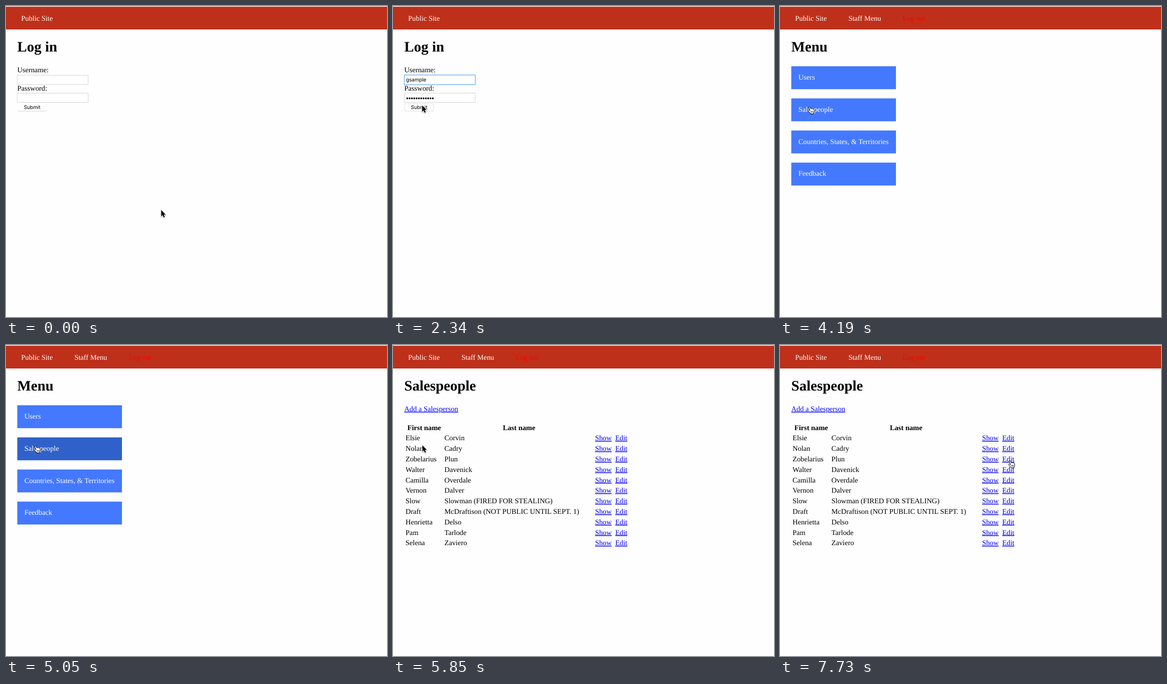
An HTML page that plays this animation: 828 px wide and 676 px high, repeating every 8000 ms.

```html
<!DOCTYPE html>
<html lang="en">
<head>
<meta charset="utf-8">
<title>Staff login</title>
<style>
  html, body { margin: 0; width: 100%; height: 100%; overflow: hidden; background: #fefefe; }
  svg { display: block; width: 828px; height: 676px; }
  text { font: 15.75px "Liberation Serif", serif; text-rendering: geometricPrecision; }
  .title { font-size: 31.5px; font-weight: bold; }
  .head { font-weight: bold; }
  .nav { fill: #fff; }
  .logout { fill: #f00; }
  .link { fill: #00e; text-decoration: underline; }
  .ui { font: 11px Inter, sans-serif; }
  .option { font: 11.7px Inter, sans-serif; }
  .field { fill: #fff; stroke: #d0d0d0; }
  .dropdown { filter: drop-shadow(0 6px 4px rgba(0, 0, 0, .5)); }
</style>
</head>
<body>
<svg viewBox="0 0 828 676" xmlns="http://www.w3.org/2000/svg">
  <defs>
    <linearGradient id="pressedFill" x2="0" y2="1">
      <stop stop-color="#69b1fa"/><stop offset="1" stop-color="#1573f5"/>
    </linearGradient>
    <g id="key">
      <path d="M9 6L1.5 13.5" stroke="#858585" stroke-width="2.8" stroke-linecap="round"/>
      <circle cx="9.5" cy="5" r="4.2" fill="#858585"/>
      <circle cx="11" cy="3.6" r="1.1" fill="#eee"/>
    </g>
  </defs>
  <rect y="1.5" width="828" height="49.5" fill="#be301a"/>
  <text class="nav" x="33" y="32">Public Site</text>
  <g id="staffNav">
    <text class="nav" x="148.7" y="32">Staff Menu</text>
    <text class="logout" x="266.5" y="32">Log out</text>
  </g>

  <g id="login">
    <text class="title" x="24.5" y="99">Log in</text>
    <text x="24.5" y="144">Username:</text>
    <rect class="field" x="24.5" y="150.5" width="154" height="20"/>
    <text x="24.5" y="184">Password:</text>
    <rect class="field" x="24.5" y="189.5" width="154" height="20"/>
    <path d="M25.5 226q1 2.5 3 2.5H85q2 0 3-2.5" fill="none" stroke="#cfcfcf"/>
    <rect id="buttonEdge" x="25.5" y="212.5" width="62.5" height="16" rx="3" fill="none" stroke="#dedede"/>
    <text class="ui" x="38.7" y="224">Submit</text>
    <g id="pressed">
      <rect x="25" y="212" width="63.5" height="17" rx="3" fill="url(#pressedFill)"/>
      <text class="ui" x="38.7" y="224" fill="#fff">Submit</text>
    </g>
    <rect id="focusRing" x="24.5" y="150" width="154.5" height="21" rx="1" fill="none" stroke="#92c1f7" stroke-width="2"/>
    <path id="caret" d="M28.5 153.5V166.5" stroke="#000"/>
    <g id="filled">
      <text class="ui" x="28.3" y="164">gsample</text>
      <path d="M31 200.7H86.7" stroke="#000" stroke-width="3.9" stroke-linecap="round" stroke-dasharray="0 5.05"/>
    </g>
    <g id="dropdown" class="dropdown">
      <rect x="24.5" y="169" width="154.5" height="40.3" fill="#fff"/>
      <rect id="optionHover" x="24.5" y="169" width="154.5" height="20" fill="#ebebeb"/>
      <use href="#key" x="30" y="172"/>
      <text class="option" x="48.7" y="184">jmarlow62</text>
      <use href="#key" x="30" y="192"/>
      <text class="option" x="48.7" y="203.6">gsample</text>
    </g>
  </g>

  <g id="menu"><text class="title" x="24.5" y="99">Menu</text></g>

  <g id="people">
    <text class="title" x="24.5" y="99">Salespeople</text>
    <text class="link" x="24.5" y="144">Add a Salesperson</text>
    <text class="head" x="31.3" y="185">First name</text>
    <text class="head" x="238.7" y="185">Last name</text>
  </g>

  <g id="arrow" style="filter: drop-shadow(0 1px 1px rgba(0,0,0,.4))">
    <path d="M.3 .5V14.3L3.4 11.4L5.8 16.6L8.1 15.6L5.8 10.5H10Z" stroke="#fff" stroke-width="1.6"/>
    <path d="M.3 .5V14.3L3.4 11.4L5.8 16.6L8.1 15.6L5.8 10.5H10Z"/>
  </g>
  <g id="hand" stroke="#000" stroke-linecap="round" stroke-linejoin="round" style="filter: drop-shadow(0 1px .7px rgba(0,0,0,.3))">
    <path fill="#fff" d="M4.8 9L3 3.5C2.5 1.4 4.8 .7 5.4 2.6L6.9 6.2C7.4 5 9.2 5.1 9.5 6.4C10 5.4 11.6 5.6 11.9 7C12.6 6.2 14 6.7 14.1 8L14.3 11C14.3 13 13.1 14 12.9 16.8H6.6C6 14.6 3 12.6 1.2 10.2C.4 8.8 2.2 7.9 3.4 9L4.9 10.4Z"/>
    <path d="M7.5 11V14M9.6 11V14M11.7 11V14" stroke-width=".8"/>
  </g>
  <g id="ibeam">
    <path d="M-2.5 -7.5Q0 -7.5 0 -5.5Q0 -7.5 2.5 -7.5M0 -5.5V5.5M-2.5 7.5Q0 7.5 0 5.5Q0 7.5 2.5 7.5M-1.5 2.5H1.5" fill="none" stroke="#000"/>
  </g>
</svg>
<script>
const LOOP = 8000;
const $ = id => document.getElementById(id);

function add(parent, tag, attrs, content = '') {
  const node = document.createElementNS('http://www.w3.org/2000/svg', tag);
  for (const name in attrs) node.setAttribute(name, attrs[name]);
  node.textContent = content;
  return parent.appendChild(node);
}

const tiles = ['Users', 'Salespeople', 'Countries, States, & Territories', 'Feedback'].map((label, i) => {
  const y = 131 + 69.8 * i;
  const tile = add($('menu'), 'rect', { x: 24.5, y, width: 227.5, height: 49.8, fill: '#4479ff' });
  add($('menu'), 'text', { class: 'nav', x: 40, y: y + 29 }, label);
  return tile;
});

const people = [
  ['Elsie', 'Corvin'], ['Nolan', 'Cadry'], ['Zobelarius', 'Plun'], ['Walter', 'Davenick'],
  ['Camilla', 'Overdale'], ['Vernon', 'Dalver'], ['Slow', 'Slowman (FIRED FOR STEALING)'],
  ['Draft', 'McDraftison (NOT PUBLIC UNTIL SEPT. 1)'], ['Henrietta', 'Delso'],
  ['Pam', 'Tarlode'], ['Selena', 'Zaviero']
];
people.forEach(([first, last], row) => {
  const y = 207.4 + 22.8 * row;
  const cell = (x, label, cls = '') => add($('people'), 'text', { x, y, class: cls }, label);
  cell(27.3, first);
  cell(111.8, last);
  cell(439.2, 'Show', 'link');
  cell(483, 'Edit', 'link');
});

// Visible spans: id, from, to
const spans = [
  ['login', 0, 4070], ['menu', 4070, 5850], ['people', 5850, LOOP], ['staffNav', 4070, LOOP],
  ['focusRing', 1160, 2700], ['buttonEdge', 1160, 2700], ['caret', 1160, 1980],
  ['dropdown', 1160, 1980], ['optionHover', 1390, 1980], ['filled', 1980, 4070],
  ['pressed', 2700, 3050]
];

// Pointer steps: time, shape, x, y
const pointer = [
  [0, 'arrow', 337, 443], [360, 'arrow', 282, 364],
  [570, 'arrow', 135, 200], [690, 'arrow', 95, 173], [800, 'ibeam', 89.5, 158.5],
  [1280, 'ibeam', 88.5, 161.5], [1390, 'arrow', 84, 176], [1510, 'arrow', 80.5, 187],
  [1630, 'arrow', 78, 192], [1740, 'arrow', 76, 195], [1860, 'arrow', 75, 197],
  [2100, 'arrow', 71, 204], [2220, 'arrow', 66, 211], [2340, 'arrow', 63, 215.5],
  [3950, 'hand', 60, 217.5], [5700, 'arrow', 63.5, 217.5],
  [6690, 'arrow', 74, 232], [6890, 'arrow', 105, 240], [7010, 'arrow', 210, 257],
  [7130, 'arrow', 345, 267], [7250, 'arrow', 435, 268],
  [7490, 'arrow', 455, 265], [7610, 'arrow', 482, 256], [7730, 'hand', 495.7, 250]
];

const show = (id, visible) => $(id).style.display = visible ? '' : 'none';

function render(t) {
  for (const [id, from, to] of spans) show(id, t >= from && t < to);
  $('optionHover').setAttribute('y', t < 1630 ? 169 : 189.3);
  tiles[1].setAttribute('fill', t >= 5050 ? '#3061ca' : '#4479ff');

  const [, shape, x, y] = pointer.findLast(step => step[0] <= t);
  for (const id of ['arrow', 'hand', 'ibeam']) show(id, id === shape);
  $(shape).setAttribute('transform', `translate(${x} ${y})`);
}

const start = performance.now();
function tick() {
  render((performance.now() - start) % LOOP);
  requestAnimationFrame(tick);
}
tick();
</script>
</body>
</html>
```
